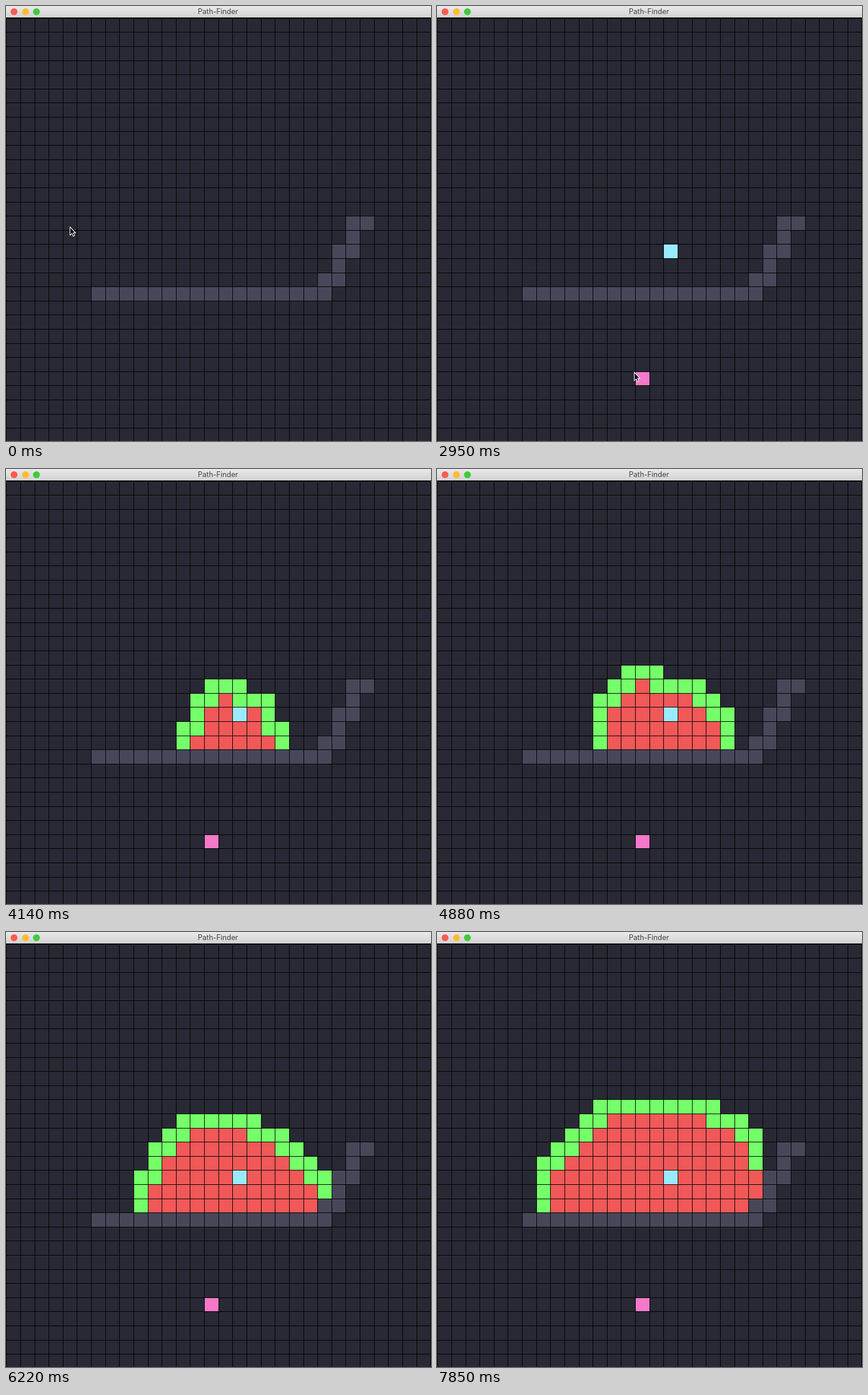
An HTML page with a canvas that plays this animation: 740x757 px, repeating every 8 s.

```html
<!DOCTYPE html>
<html lang="en">
<head>
<meta charset="utf-8">
<title>Path-Finder</title>
<style>
  html, body { margin: 0; width: 100%; height: 100%; overflow: hidden; background: #282934; }
  canvas { position: absolute; left: 0; top: 0; }
  .bar {
    position: absolute; left: 0; top: 0; width: 740px; height: 20px;
    background: linear-gradient(#e9e9e9, #d2d2d2);
    font: 12.6px/20px Inter, Roboto, sans-serif; color: #434343; text-align: center;
  }
  .bar span { position: absolute; left: 0; width: 738px; }
  .bar i { position: absolute; top: 4px; width: 12px; height: 12px; border-radius: 50%; }
</style>
</head>
<body>
<canvas id="stage" width="740" height="757"></canvas>
<div class="bar">
  <i style="left:8px;background:#fc5b53"></i>
  <i style="left:27.5px;background:#fdbc30"></i>
  <i style="left:47px;background:#42ca3a"></i>
  <span>Path-Finder</span>
</div>
<script>
const ctx = document.getElementById('stage').getContext('2d');
const SIZE = 30, LOOP = 8000;
const COLOR = {
  floor: '#282934', line: '#000', wall: '#46485a',
  start: '#9aeaff', goal: '#f578ca', open: '#75ff69', closed: '#f15858'
};
const start = { x: 16, y: 16 }, goal = { x: 14, y: 25 };

const lineX = c => Math.round(c * 24.63 + 0.3);
const lineY = r => Math.round(r * 24.6 + 20.7);
const id = (x, y) => y * SIZE + x;

const walls = new Set();
// Each run: row, first column, last column
[[19, 6, 22], [18, 22, 23], [17, 23, 23], [16, 23, 24], [15, 24, 24], [14, 24, 25]]
  .forEach(([y, a, b]) => { for (let x = a; x <= b; x++) walls.add(id(x, y)); });

const isFree = (x, y) =>
  x >= 0 && y >= 0 && x < SIZE && y < SIZE && !walls.has(id(x, y));

// Eight directions, without cutting wall corners
function neighbours({ x, y }) {
  const list = [];
  for (let dy = -1; dy <= 1; dy++) {
    for (let dx = -1; dx <= 1; dx++) {
      if ((dx || dy) && isFree(x + dx, y + dy) && isFree(x + dx, y) && isFree(x, y + dy)) {
        list.push({ x: x + dx, y: y + dy, cost: dx && dy ? 14 : 10 });
      }
    }
  }
  return list;
}

function octile(a, b) {
  const dx = Math.abs(a.x - b.x), dy = Math.abs(a.y - b.y);
  return 10 * Math.max(dx, dy) + 4 * Math.min(dx, dy);
}

// A* expansion order; ties go to the cell nearest the middle of the search
function search(limit) {
  const tie = n => (n.x - 14.1) ** 2 + (n.y - 16) ** 2;
  const nodes = new Map(), order = [];
  const first = { ...start, g: 0, f: octile(start, goal) };
  nodes.set(id(first.x, first.y), first);
  while (order.length < limit) {
    const open = [...nodes.values()].filter(n => !n.done);
    const best = open.reduce((a, b) => (b.f - a.f || tie(b) - tie(a)) < 0 ? b : a);
    best.done = true;
    order.push(best);
    for (const { x, y, cost } of neighbours(best)) {
      const g = best.g + cost, known = nodes.get(id(x, y));
      if (!known) nodes.set(id(x, y), { x, y, g, f: g + octile({ x, y }, goal) });
      else if (!known.done && g < known.g) {
        known.f += g - known.g;
        known.g = g;
      }
    }
  }
  return order;
}
const order = search(95);

// Pointer stops: step, x, y
const stops = [
  [0, 111, 384], [2, 180, 387], [4, 335, 409], [5, 405, 423], [6, 417, 427],
  [7, 411, 440], [8, 393, 457], [10, 325, 488], [13, 205, 560], [15, 225, 608],
  [16, 261, 621], [17, 315, 632], [18, 343, 637]
];

function pointerAt(t) {
  if (t >= 3400) return t < 3545 ? [352, 742] : null;
  const step = Math.min(18, Math.floor((t + 8) / 148.1));
  const i = Math.max(1, stops.findIndex(s => s[0] >= step));
  const a = stops[i - 1], b = stops[i], p = (step - a[0]) / (b[0] - a[0]);
  return [1, 2].map(k => Math.round(a[k] + (b[k] - a[k]) * p));
}

function fillCell(x, y, color) {
  const left = lineX(x) + 1, top = lineY(y) + 1;
  ctx.fillStyle = color;
  ctx.fillRect(left, top, lineX(x + 1) - left, lineY(y + 1) - top);
}

function drawGrid() {
  ctx.fillStyle = COLOR.floor;
  ctx.fillRect(0, 0, 740, 757);
  ctx.fillStyle = COLOR.line;
  ctx.fillRect(0, 20, 740, 1);
  for (let i = 0; i <= SIZE; i++) {
    ctx.fillRect(lineX(i), 20, 1, 737);
    ctx.fillRect(0, lineY(i), 740, 1);
  }
  walls.forEach(w => fillCell(w % SIZE, Math.floor(w / SIZE), COLOR.wall));
}

const arrow = new Path2D('M.5 .5V14.8L3.8 11.8L6 16.8L8.3 15.8L6.2 10.9H10.2Z');
function drawPointer([x, y]) {
  ctx.save();
  ctx.translate(x, y);
  ctx.fillStyle = '#000';
  ctx.strokeStyle = '#fff';
  ctx.lineWidth = 1.1;
  ctx.fill(arrow);
  ctx.stroke(arrow);
  ctx.restore();
}

function draw(t) {
  drawGrid();
  if (t >= 3390) {
    const count = Math.floor(0.9 + 2.84 * Math.floor((t - 3390) / 148.4));
    const done = order.slice(0, count);
    done.forEach(n => neighbours(n).forEach(m => fillCell(m.x, m.y, COLOR.open)));
    done.forEach(n => fillCell(n.x, n.y, COLOR.closed));
  }
  if (t >= 885) fillCell(start.x, start.y, COLOR.start);
  if (t >= 2945) fillCell(goal.x, goal.y, COLOR.goal);
  const pointer = pointerAt(t);
  if (pointer) drawPointer(pointer);
}

let began;
function tick(now) {
  began ??= now;
  draw((now - began) % LOOP);
  requestAnimationFrame(tick);
}
draw(0);
requestAnimationFrame(tick);
</script>
</body>
</html>
```
